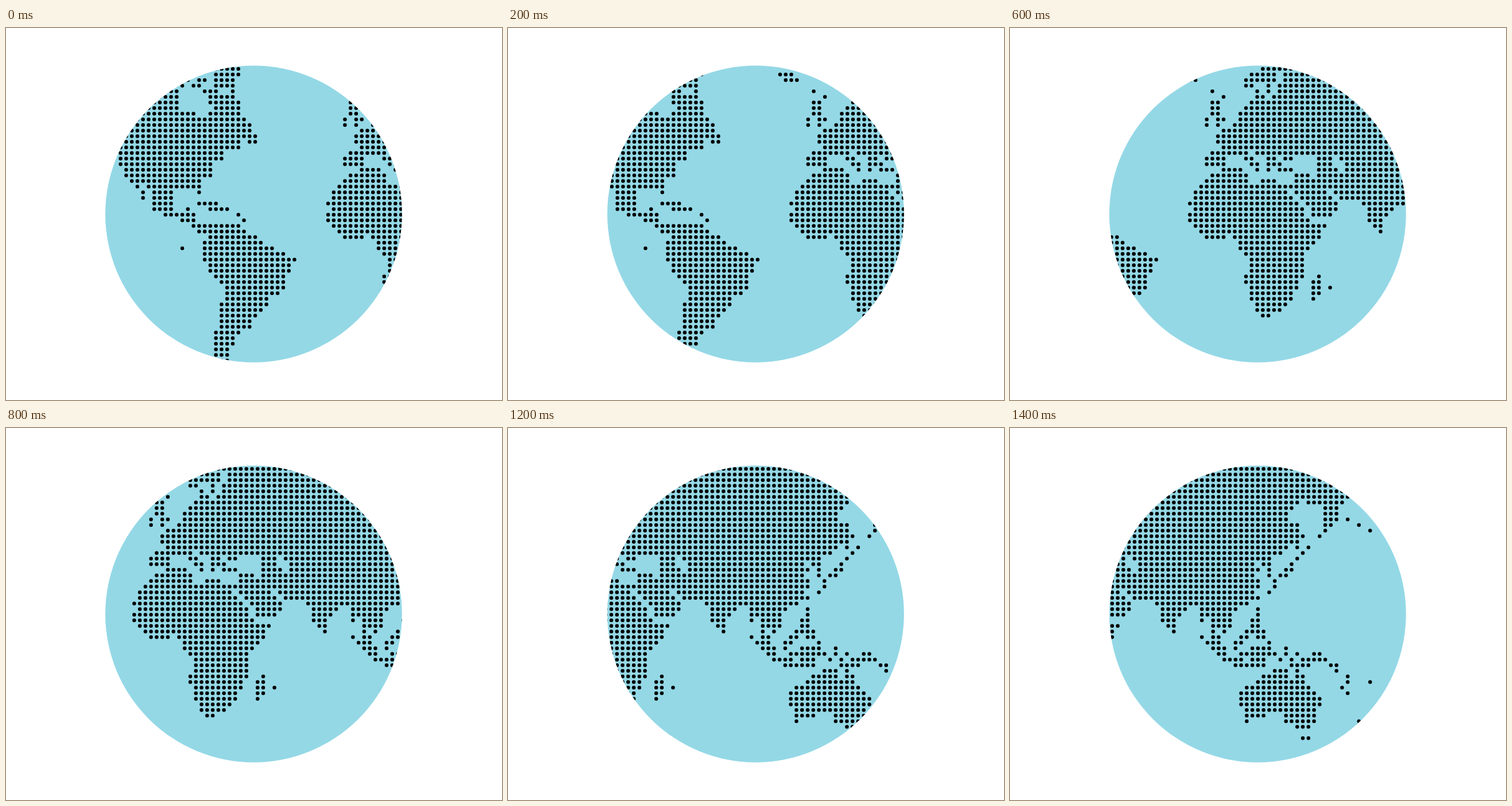
An HTML page that plays this animation: 864x648 px, repeating every 1600 ms.

```html
<!DOCTYPE html>
<html lang="en">
<head>
<meta charset="utf-8">
<title>Turning globe</title>
<style>
  html, body { margin: 0; width: 100%; height: 100%; overflow: hidden; background: #fff; }
  svg { display: block; width: 100vw; height: 100vh; }
</style>
</head>
<body>
<svg viewBox="0 0 864 648">
  <defs><clipPath id="disc"><circle cx="431.4" cy="324" r="258.4"/></clipPath></defs>
  <circle cx="431.4" cy="324" r="258.4" fill="#94d8e6"/>
  <g clip-path="url(#disc)">
    <path id="dots" fill="none" stroke="#000" stroke-width="6.5" stroke-linecap="round"/>
  </g>
</svg>
<script>
// Coastlines in grid units: x is the dot column, y the dot row.
const LAND = {
  northAmerica: 'M0 4H10V7L13 8L14 9H15L17 7L16 6V5L15 4H17L18 5H19L20 4V5L21 6V8L23 10V11' +
    'L24 12V13H23L22 12L21 13V14L18 15V16L16 17V19L14 20V22L13 21H10L9 22V25L13 26V27H11' +
    'L8 26L6 25V22L5 21L2 20L1 19V18L0 17Z',
  arctic: 'M17 0H21V1L20 2V3H17ZM14 2H15M13 3H14M11 3h.1M12 2h.1',
  caribbean: 'M14 24H17M16 25H19M12 25h.1M21 26L22 27M3 21L4 22V23M11 32h.1',
  southAmerica: 'M13 28H21L22 29L24 30L25 31L27 32L29 33L31 34L30 35V36L29 37V39L28 40L26 41V42' +
    'L23 45V46L21 47L20 48V49L19 50V52H17V47L18 46V42L19 41V39L16 36V35L15 34V31L16 30L14 29Z',
  northAtlantic: 'M35 1H37L38 2H36ZM41 4h.1M43 5h.1M41 6H42V8H41ZM40 9V10M42 8V10M42 9H43',
  scandinavia: 'M50 0H53L52 1V2H47L48 1ZM47 2V3H48V2M51 2V4M49 4V5H50',
  europe: 'M54 0H60V15H56L55 16H54L53 15L52 16L53 17H51V18V16L50 15H49L48 14L47 15L49 17V18' +
    'L46 15H44L43 16V17H40V16L41 15L43 14L42 13V12L43 11L45 10L46 9V8L48 6H51L52 5L53 4V3L54 2Z',
  anatolia: 'M53 17V18H55',
  asia: 'M60 0H102V5L100 7V9L98 11V6H95L94 5L92 7L91 8V9L93 10V11L94 12L93 13L91 14L90 15L88 16' +
    'V19L87 17L86 16L85 17L86 18L85 19L86 20V21L85 22L86 23L84 24L82 25L81 26V28L80 29L79 28' +
    'L78 29V27L77 26L76 27V25L75 24H74L71 27V29L69 27V25L67 23H64L62 21L61 22L63 24V25L62 26' +
    'H59V25L56 22V19H58L59 20L60 19ZM63 15L65 17V18L64 19L62 17V16Z',
  africa: 'M43 18H46L47 19V20L48 21H49L50 20H52L53 21H55L54 22L57 25V26L58 27L61 28L60 29V30' +
    'L57 33V37L56 38V39L55 40V41L53 43L51 44H50L49 43V42L48 41V39L47 38V37L48 36V34L46 32V31' +
    'L44 29L43 30H40L37 27V26L38 25L37 24L38 23V22L41 19Z',
  madagascar: 'M60 37V40L59 41V38ZM62 39h.1',
  japan: 'M95 14L92 17V18H91V19H90L89 20V21L88 22M93 13V14M98 11L97 12',
  indonesia: 'M76 30L78 32L80 34H83L82 35L80 34V32L79 31V30L78 29V32ZM82 35H87M85 34H87M90 34h.1' +
    'M85 32H88L89 33H83M91 32V33M93 33h.1',
  philippines: 'M86 25V30M85 27V29M84 29H87V30M87 30L88 31M82 32V31L84 29V30H83M82 31H83',
  newGuinea: 'M96 33H97L98 34H94M92 34V35H95M99 35H100V36',
  australia: 'M89 36H91V37L92 38L93 36L94 37V38L97 41V42L96 43V45L95 46H93L91 45V44L90 43H88' +
    'L87 44H84V45V43L83 42V40L84 39L86 38L87 37ZM94 48H95',
  pacific: 'M102 9h.1M104 10h.1M106 11h.1M102 37V38L101 39M102 40h.1M106 38h.1M104 45h.1'
};
const COLS = 107, ROWS = 53, PITCH = 9.77, LEFT = 199.6, TOP = 71.2;
const LOOP = 1600, STEP = 200, FIRST_SHIFT = 67.6, SHIFT = 90.05;

const pen = document.createElement('canvas').getContext('2d');
pen.lineWidth = 0.3;
pen.lineCap = pen.lineJoin = 'round';
const coasts = Object.values(LAND).map(d => new Path2D(d));

// A dot is land when it lies within a coastline or right on it.
const isLand = (x, y) => coasts.some(p =>
  pen.isPointInPath(p, x, y, 'evenodd') || pen.isPointInStroke(p, x, y));

function dotMap() {
  let d = '';
  for (let row = 0; row < ROWS; row++) {
    for (let col = 0; col < COLS; col++) {
      if (!isLand(col, row)) continue;
      d += `M${(LEFT + col * PITCH).toFixed(2)} ${(TOP + row * PITCH).toFixed(2)}h0`;
    }
  }
  return d;
}

const dots = document.getElementById('dots');
dots.setAttribute('d', dotMap());

function draw(time) {
  const step = Math.floor(time % LOOP / STEP);
  const shift = step ? FIRST_SHIFT + (step - 1) * SHIFT : 0;
  dots.setAttribute('transform', `translate(${-shift} 0)`);
}

function tick() {
  draw(performance.now());
  requestAnimationFrame(tick);
}
tick();
</script>
</body>
</html>
```
